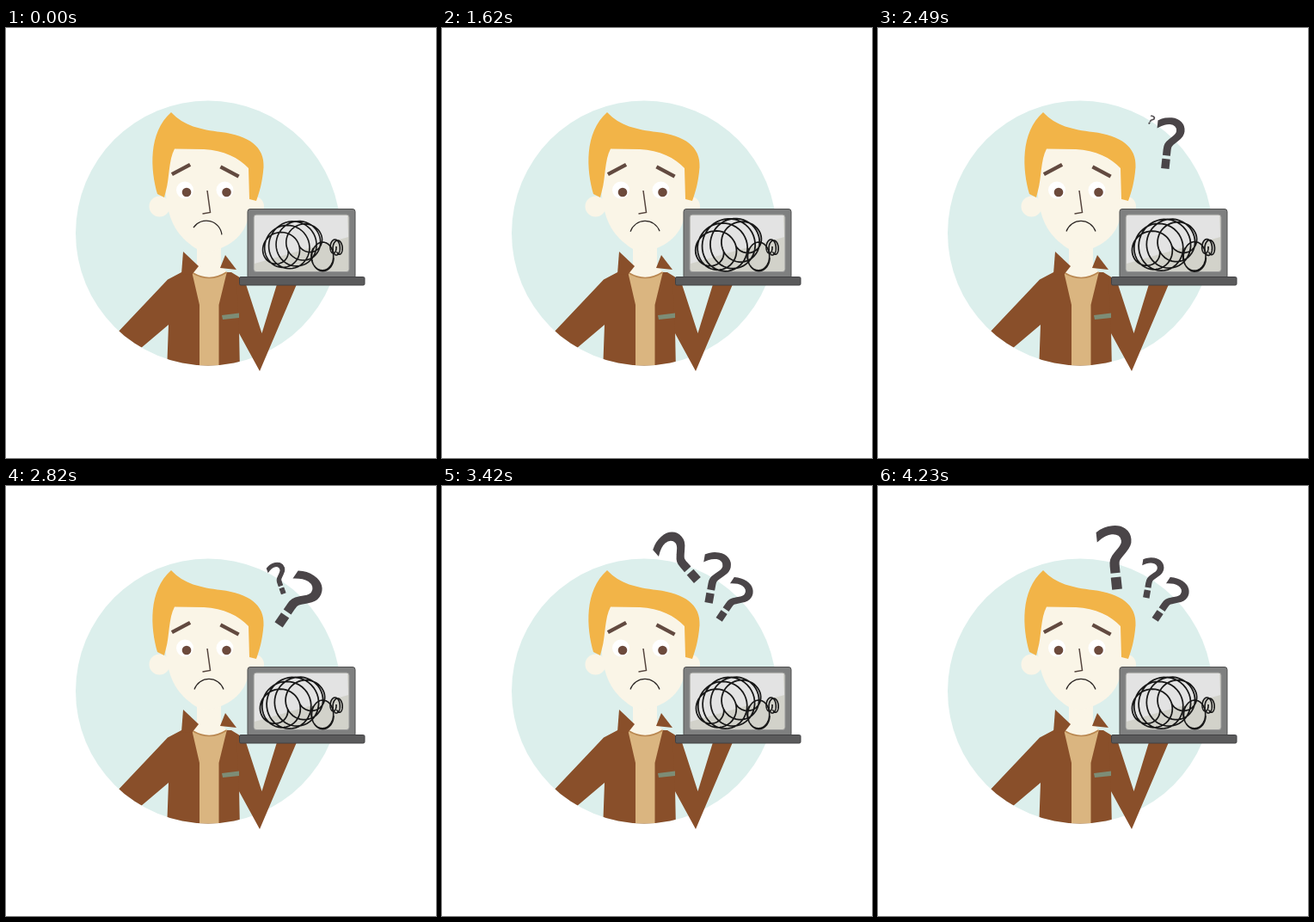
These frames come from a looping animation (500 px wide and 500 px high, 4500 ms). An HTML page with a canvas:

```html
<!DOCTYPE html>
<html lang="en">
<head>
<meta charset="utf-8">
<title>Puzzled man with laptop</title>
<style>
html, body { margin: 0; width: 100%; height: 100%; overflow: hidden; background: #fff; }
canvas { display: block; width: 500px; height: 500px; }
</style>
</head>
<body>
<canvas id="stage"></canvas>
<script>
const LOOP = 4500;
const canvas = document.getElementById('stage');
const ctx = canvas.getContext('2d');
const ratio = window.devicePixelRatio || 1;
canvas.width = canvas.height = 500 * ratio;

const SKIN = '#faf5e7', BROWN = '#894f2a', TAN = '#dab580', HAIR = '#f2b448';

const clamp = u => Math.max(0, Math.min(1, u));
const mix = (a, b, u) => a + (b - a) * u;
const expoOut = u => u <= 0 ? 0 : 1 - Math.pow(2, -10 * clamp(u));
const backOut = (u, c) => 1 + (c + 1) * Math.pow(u - 1, 3) + c * Math.pow(u - 1, 2);
// Quick rise to 1 at a third of the way, slow fall back to 0.
const bump = u => 6.75 * u * (1 - u) * (1 - u);

function shape(d, color) {
  ctx.fillStyle = color;
  ctx.fill(new Path2D(d));
}

function line(d, color, width) {
  ctx.strokeStyle = color;
  ctx.lineWidth = width;
  ctx.stroke(new Path2D(d));
}

function disc(x, y, r, color) {
  ctx.fillStyle = color;
  ctx.beginPath();
  ctx.arc(x, y, r, 0, Math.PI * 2);
  ctx.fill();
}

function box(x, y, w, h, r, fill, stroke) {
  ctx.beginPath();
  ctx.roundRect(x, y, w, h, r);
  ctx.fillStyle = fill;
  ctx.fill();
  if (stroke) {
    ctx.strokeStyle = stroke;
    ctx.lineWidth = 1;
    ctx.stroke();
  }
}

function posed(x, y, scale, degrees, draw) {
  ctx.save();
  ctx.translate(x, y);
  ctx.rotate(degrees * Math.PI / 180);
  ctx.scale(scale, scale);
  draw();
  ctx.restore();
}

function body() {
  ctx.save();
  ctx.beginPath();
  ctx.arc(235, 238.5, 154, 0, Math.PI * 2);
  ctx.fillStyle = '#dcefec';
  ctx.fill();
  ctx.clip();
  shape('M206 283 L188 292.5 L126 358 L150 378 L189 345 L187 400 H272 L271 350 L285 330 L275 292 L262 284 Z', BROWN);
  shape('M216 283 L225 322 V400 H247.5 V322 L257 283 Z', TAN);
  ctx.restore();

  shape('M271 355 L295 399 L338 298 H315 L297.5 355 L279 298 L268 288 Z', BROWN);
  shape('M251 334 L271 331.5 V337 L252 339 Z', '#7d8d76');
  shape('M222 246 V278 L217 285 Q237 297 257 284 L250 276 V246 Z', SKIN);
  line('M217.5 285 Q237 296.5 256.5 284', '#b98750', 1.6);
  shape('M206 260 L224 277 L216 287 L204 286 Z', BROWN);
  shape('M255 264 L268 281 L249 279 Z', BROWN);
}

function head() {
  disc(178.5, 207.5, 12, SKIN);
  disc(288, 207.5, 12, SKIN);
  shape('M184 140 H285 V196 C284 229 274 246 250 256 Q236 263 222 257 C205 246 190 232 186 196 Z', SKIN);
  shape('M176 193 C168 165 165 122 192 98 C207 114 226 118 250 121 C282 125 301 138 299.5 162 ' +
    'C298 180 295 190 291 201 L283 199 L282 163 C271 151 253 142 230 141 L196 140.5 ' +
    'C189 153 190 176 186 189 L184 197 Z', HAIR);

  for (const [x, dir] of [[208, -1], [254.5, 1]]) {
    disc(x, 188.5, 10, '#fff');
    disc(x + 2, 191, 5.3, '#6c4a3c');
    posed(x + 5.5 * dir - (dir < 0 ? -1 : 0), dir < 0 ? 164.5 : 167, 1, 28 * dir,
      () => line('M-12 0 H12', '#624a40', 4.5));
  }
  line('M234 189 L237.5 214.5 L228.5 216', '#55453e', 1.5);
}

function mouth(t) {
  const angle = 14 - 39 * expoOut((t - 160) / 1000) + 25 * expoOut((t - 1160) / 900);
  posed(236, 230, 1, angle, () => line('M-17 6.5 A18 18 0 0 1 17 6.5', '#2b2523', 1.2));
}

function laptop() {
  box(281, 210.5, 125, 81, 3, '#7f8080', '#4f4f4f');
  box(288, 217, 111, 66.5, 3, '#d2d2ca', '#979797');
  shape('M290 218 H397 L398 243 L289 274 V220 Z', '#e3e3e3');
  box(271.5, 289.5, 145.5, 9.5, 1.5, '#5b5b5c', '#404042');
}

// A coil winds from one centre to another, widest halfway.
const coils = [
  { from: [313, 259], to: [353, 245], radius: [15, 14], bulge: [11, 13], turns: 5.4,
    grow: t => 1 + .09 * backOut(clamp((t - 1240) / 900), 3) },
  { from: [369, 267], to: [367, 265], radius: [12, 15], bulge: [1, 2], turns: 1.6,
    grow: t => 1 + .13 * bump(clamp((t - 1790) / 880)) },
  { from: [380, 254], to: [388, 256], radius: [4, 7], bulge: [1, 2], turns: 2.4,
    grow: t => 1 + .2 * bump(clamp((t - 1790) / 880)) }
];

function coil(c, t) {
  const x = mix(c.from[0], c.to[0], .5), y = mix(c.from[1], c.to[1], .5);
  posed(x, y, c.grow(t), 0, () => {
    ctx.beginPath();
    for (let i = 0; i <= 240; i++) {
      const u = i / 240, a = u * c.turns * 2 * Math.PI, wide = Math.sin(Math.PI * u);
      ctx.lineTo(mix(c.from[0], c.to[0], u) - x + (c.radius[0] + c.bulge[0] * wide) * Math.cos(a),
        mix(c.from[1], c.to[1], u) - y + (c.radius[1] + c.bulge[1] * wide) * Math.sin(a));
    }
    ctx.strokeStyle = '#171717';
    ctx.lineWidth = 1.6;
    ctx.stroke();
  });
}

const marks = [
  { x: 339.5, y: 134, size: 72, angle: 34, lean: 43 },
  { x: 318, y: 107, size: 62, angle: 10, lean: 14 },
  { x: 277.5, y: 83, size: 97, angle: -6, lean: 26 }
];

function growth(age) {
  if (age < 1050) return 1.28 * Math.pow(Math.sin(age / 1050 * Math.PI / 2), 1.3);
  return 1 + .14 * (1 + Math.cos(Math.PI * clamp((age - 1050) / 330)));
}

function swing(age, lean) {
  return age < 400 ? lean * (400 - age) / 160 : -36 * bump(clamp((age - 400) / 600));
}

function mark(m, age) {
  if (age <= 0) return;
  posed(m.x, m.y, growth(age), m.angle + swing(age, m.lean), () => {
    const x = -.275 * m.size, y = .371 * m.size;
    ctx.font = m.size + 'px "DejaVu Sans", sans-serif';
    ctx.fillStyle = ctx.strokeStyle = '#4a4548';
    ctx.lineWidth = .022 * m.size;
    ctx.fillText('?', x, y);
    ctx.strokeText('?', x, y);
  });
}

function frame(t) {
  ctx.setTransform(ratio, 0, 0, ratio, 0, 0);
  ctx.fillStyle = '#fff';
  ctx.fillRect(0, 0, 500, 500);
  body();
  head();
  mouth(t);
  laptop();
  coils.forEach(c => coil(c, t));
  marks.forEach((m, i) => mark(m, t - 1770 - 540 * i));
}

const begin = performance.now();
function tick() {
  frame((performance.now() - begin) % LOOP);
  requestAnimationFrame(tick);
}
tick();
</script>
</body>
</html>
```
